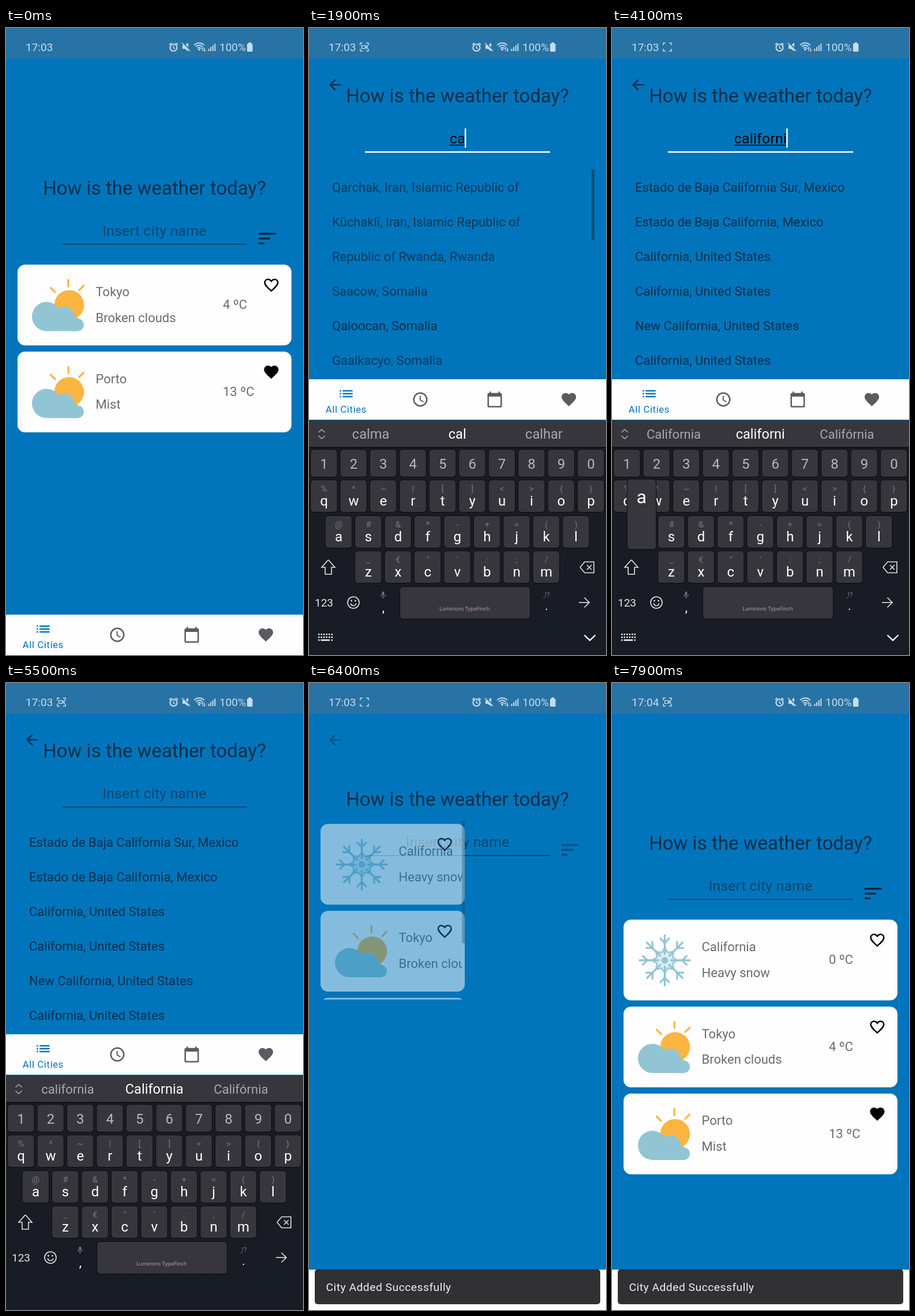
An HTML page with a canvas that plays this animation: 515 px wide and 1087 px high, repeating every 8 s.

```html
<!DOCTYPE html>
<html lang="en">
<head>
<meta charset="utf-8">
<title>Weather search</title>
<style>
html, body { margin: 0; height: 100%; overflow: hidden; background: #0075bb; }
canvas { display: block; width: 100vw; height: 100vh; }
</style>
</head>
<body>
<canvas id="stage" width="515" height="1087"></canvas>
<script>
const W = 515, H = 1087, MID = 257.5, LOOP = 8000;
const screen2d = document.getElementById('stage').getContext('2d');
const layer = document.createElement('canvas');
layer.width = W;
layer.height = H;
const layer2d = layer.getContext('2d');
let c = screen2d;

const BLUE = '#0075bb', INK = 'rgba(0,0,0,.6)', FAINT = 'rgba(0,0,0,.4)';
const SUN = '#fbb540', CLOUD = '#92c5d3', KEY = '#36363c', STATUS = '#c8dbe8', NAV = '#5c5c60';
const HINT = 'Insert city name';
const HEART = new Path2D('M12 21.35l-1.45-1.32C5.4 15.36 2 12.28 2 8.5 2 5.42 4.42 3 7.5 3c1.74 0 3.41.81 4.5 2.09C13.09 3.81 14.76 3 16.5 3 19.58 3 22 5.42 22 8.5c0 3.78-3.4 6.86-8.55 11.54z');

// Trailing spaces keep equally named results distinct.
const us = 'California, United States';
const baja = ['Estado de Baja California Sur, Mexico', 'Estado de Baja California, Mexico', us, us + ' '];
const withC = ['Qarchak, Iran, Islamic Republic of', 'Kūchaklī, Iran, Islamic Republic of',
  'Republic of Rwanda, Rwanda', 'Saacow, Somalia', 'Qaloocan, Somalia', 'Gaalkacyo, Somalia'];
const withCa = ['Qaloocan, Somalia', 'Caluula, Somalia', 'Cadale, Somalia', 'Calabar, Nigeria', 'Caracas, Venezuela', 'Calais, France'];
const withCal = ['Caluula, Somalia', 'Calabar, Nigeria', 'Calais, France', 'Calella, Spain', 'Calgary, Canada', 'Cali, Colombia'];
const withCali = ['Cali, Colombia', 'Calimaya, Mexico', ...baja];
const withCalif = [...baja, 'Califon, United States', 'New California, United States'];
const withCalifor = [...baja, 'New California, United States', us + '  '];

// time, typed text, suggestions, results
const steps = [
  [0, '', 'Não Mas E', []],
  [1350, 'c', 'com c como', withC],
  [1870, 'ca', 'calma cal calhar', withCa],
  [2130, 'cal', 'calma cal calhar', withCal],
  [2380, 'cali', 'California cali calibre', withCali],
  [2600, 'calif', 'California calif Califórnia', withCalif],
  [2850, 'califo', 'California califo Califórnia', withCalif],
  [3150, 'califor', 'California califor Califórnia', withCalifor],
  [3450, 'californ', 'California californ Califórnia', withCalifor],
  [3800, 'californi', 'California californi Califórnia', withCalifor],
  [4150, 'california', 'california California Califórnia', withCalifor]
];
const FOCUS = 150, CLEAR = 5450, ADDED = 5883;

const clamp = x => Math.max(0, Math.min(1, x));
const ramp = (t, from, span) => clamp((t - from) / span);
const ease = x => x * x * (3 - 2 * x);

function font(size, weight = 400, gap = 0, family = 'Roboto') {
  c.font = `${weight} ${size}px ${family}, sans-serif`;
  c.letterSpacing = gap + 'px';
}
function text(s, x, y, size, color, align = 'left', weight, gap, family) {
  font(size, weight, gap, family);
  c.textAlign = align;
  c.fillStyle = color;
  c.fillText(s, x, y);
}
function rect(x, y, w, h, color, r = 0) {
  c.fillStyle = color;
  c.beginPath();
  c.roundRect(x, y, w, h, r);
  c.fill();
}
function disc(x, y, r, color) {
  c.fillStyle = color;
  c.beginPath();
  c.arc(x, y, r, 0, 7);
  c.fill();
}
function arc(x, y, r, color, width, from = 0, to = 7) {
  c.strokeStyle = color;
  c.lineWidth = width;
  c.beginPath();
  c.arc(x, y, r, from, to);
  c.stroke();
}
function line(color, width, ...p) {
  c.strokeStyle = color;
  c.lineWidth = width;
  c.beginPath();
  for (let i = 0; i < p.length; i += 2) c.lineTo(p[i], p[i + 1]);
  c.stroke();
}
function group(draw, alpha = 1) {
  c.save();
  c.globalAlpha *= alpha;
  draw();
  c.restore();
}
// Draws in a 24-unit box centred on x, y.
function icon(x, y, scale, draw, alpha) {
  group(() => {
    c.translate(x - 12 * scale, y - 12 * scale);
    c.scale(scale, scale);
    draw();
  }, alpha);
}
function heart(x, y, color, full) {
  icon(x, y, 1.2517, () => {
    c.fillStyle = c.strokeStyle = color;
    if (full) return c.fill(HEART);
    c.clip(HEART);
    c.lineWidth = 4;
    c.stroke(HEART);
  });
}

function statusBar(t) {
  rect(0, 0, W, 53, '#2873a5');
  text(t < 7600 ? '17:03' : '17:04', 34, 40, 19, STATUS);
  if (t >= 100) {
    for (const a of [-1, 1]) for (const b of [-1, 1])
      line(STATUS, 1.5, 96 + 3 * a, 33 + 7 * b, 96 + 7 * a, 33 + 7 * b, 96 + 7 * a, 33 + 3 * b);
    if (t % 1000 >= 450) {
      c.strokeStyle = STATUS;
      c.lineWidth = 1.3;
      c.strokeRect(91.5, 30.5, 6, 5);
      line(STATUS, 1.3, 98, 33, 101, 30.5, 101, 35.5, 98, 33);
    }
  }
  arc(290.5, 34, 6, STATUS, 2.2);
  line(STATUS, 1.5, 290.5, 30.5, 290.5, 34.5, 293, 36);
  line(STATUS, 2, 283, 29, 287, 26);
  line(STATUS, 2, 298, 29, 294, 26);
  c.fillStyle = STATUS;
  c.beginPath();
  for (const [x, y] of [[306, 30], [310, 30], [316, 25.5], [316, 40.5], [310, 36], [306, 36]]) c.lineTo(x, y);
  c.fill();
  line('#2873a5', 3, 306, 25, 320, 40);
  line(STATUS, 1.6, 305, 26, 319, 40);
  for (const r of [4, 8, 12]) arc(335, 38, r, STATUS, 1.8, -2.4, -.74);
  disc(335, 37.5, 1.8, STATUS);
  line(STATUS, 1.3, 339, 36, 341, 34, 341, 40);
  line(STATUS, 1.3, 344, 34, 344, 40, 346, 38);
  for (let i = 0; i < 4; i++) rect(350.5 + 3.6 * i, 36 - 3 * i, 2, 4 + 3 * i, STATUS);
  text('100%', 370, 40, 19, STATUS);
  rect(418, 27, 9.5, 14, STATUS, 1.5);
  rect(420.5, 25, 4.5, 3, STATUS);
}

function navBar(top) {
  rect(0, top, W, 70, '#fefdff');
  icon(64.4, top + 25, 1.2517, () => {
    for (const y of [7, 11, 15]) {
      rect(3, y, 2, 2, BLUE);
      rect(7, y, 14, 2, BLUE);
    }
  });
  text('All Cities', 64.4, top + 58, 16.52, BLUE, 'center', 400, .69);
  icon(193, top + 35, 1.2517, () => {
    arc(12, 12, 9, NAV, 2);
    line(NAV, 1.6, 11.8, 7, 11.8, 12.6, 16.3, 15.4);
  });
  icon(322, top + 35, 1.2517, () => {
    rect(2, 3, 20, 20, NAV, 2);
    rect(4, 8, 16, 13, '#fefdff');
    rect(5, 1, 2, 3, NAV);
    rect(17, 1, 2, 3, NAV);
  });
  heart(450.6, top + 35, NAV, true);
}

function partlyCloudy() {
  disc(109.5, 70, 25.8, SUN);
  line(SUN, 3.2, 108.2, 26.5, 108.2, 37.5);
  line(SUN, 3.2, 77.5, 40, 85, 47.5);
  line(SUN, 3.2, 127, 44, 134.5, 36.5);
  disc(70.3, 89.8, 25.3, CLOUD);
  disc(101, 91, 18.5, CLOUD);
  rect(70, 92, 55, 23.2, CLOUD);
  rect(103, 93.5, 32, 21.7, CLOUD, 10.8);
}
function snowflake() {
  group(() => {
    c.translate(90.5 + 1, 70.5);
    for (let i = 0; i < 8; i++) {
      group(() => {
        c.rotate(i * Math.PI / 4);
        c.fillStyle = '#dcecf2';
        c.beginPath();
        c.moveTo(0, 0);
        c.lineTo(9, -12);
        c.lineTo(0, -22);
        c.lineTo(-9, -12);
        c.fill();
      });
    }
    for (let i = 0; i < 8; i++) {
      c.rotate(Math.PI / 4);
      line(CLOUD, 3.4, 0, -11, 0, -43.5);
      line(CLOUD, 3.2, -7.5, -38, 0, -30, 7.5, -38);
      line(CLOUD, 2.4, -5.5, -13.5, 0, -22, 5.5, -13.5);
      disc(0, -4.5, 1.8, CLOUD);
    }
    disc(0, 0, 4.8, CLOUD);
  });
}

function cards(t, p, bottom) {
  const data = [['Tokyo', 'Broken clouds', '4 ºC', false], ['Porto', 'Mist', '13 ºC', true]];
  if (t > 5600) data.unshift(['California', 'Heavy snow', '0 ºC', false]);
  const right = 20 + 475 * (1 - p), top = 410.3 - 351 * p;
  const end = (bottom - 12.4) * (1 - p) + 41 * p, view = end - top + 5;
  if (view <= 0 || right < 24) return;
  c = layer2d;
  c.clearRect(0, 0, W, H);
  group(() => {
    c.lineCap = 'round';
    c.beginPath();
    c.rect(20, top - 5, right - 20, view);
    c.clip();
    data.forEach(([city, sky, temp, liked], i) => group(() => {
      c.translate(0, top + 150.7 * i);
      rect(20, 0, right - 20, 140, '#fefdff', 13);
      group(() => {
        c.beginPath();
        c.rect(20, 0, right - 25, 140);
        c.clip();
        (city === 'California' ? snowflake : partlyCloudy)();
        text(city, 155.5, 54.5, 22.03, '#6b6b6e');
        text(sky, 155.5, 99.3, 22.03, '#6b6b6e');
        text(temp, 376, 77, 22.03, '#6b6b6e');
      });
      heart(right - 35, 35.5, '#000', liked);
    }));
    const content = 150.7 * data.length;
    if (view < content) rect(right - 5, top - 5, 5, view * view / content, 'rgba(0,0,0,.3)');
  });
  c = screen2d;
  group(() => c.drawImage(layer, 0, 0), 1 - p);
}

function results(t, k, p) {
  const now = steps[k][3], before = k ? steps[k - 1][3] : [], age = t - steps[k][0];
  const row = (s, i, alpha) => group(() => text(s.trim(), 40, 284 + 60 * i, 22.03, INK), alpha * p);
  group(() => {
    c.beginPath();
    c.rect(0, 225, W, 384);
    c.clip();
    before.forEach((s, i) => {
      if (!now.includes(s)) row(s, i, 1 - ramp(age, 0, 200));
    });
    now.forEach((s, i) => {
      const old = before.indexOf(s);
      if (old < 0) row(s, i, ramp(age, 150, 100));
      else row(s, old + (i - old) * ease(ramp(age, 100, 120)), 1);
    });
    const bar = ramp(t, 1500, 60) * (1 - ramp(t, 2000, 250));
    if (bar) group(() => rect(490, 245, 5, 123, 'rgba(0,0,0,.3)'), bar);
  });
}

function searchField(t, y, typed, lastKey) {
  const focused = t >= FOCUS && t < CLEAR;
  text('How is the weather today?', MID, y + 11.5, 33.05, INK, 'center');
  if (typed) text(typed, MID, y + 82.5, 24.78, '#000', 'center', 400, .23);
  else text(HINT, MID, y + 83, 24.78, FAINT, 'center', 400, .23);
  font(24.78, 400, .23);
  const half = c.measureText(typed || HINT).width / 2;
  if (typed) rect(MID - half, y + 85.5, 2 * half, 1.4, '#000');
  if (!focused) return rect(97, y + 97.2, 321, 1.4, INK);
  rect(97, y + 96.7, 321, 2.6, '#fff');
  if ((t - Math.max(lastKey, FOCUS)) % 1000 < 500)
    rect(MID + (typed ? half : -half) - 1, y + 57, 2.5, 33.5, '#fff');
}

const rows = [
  ['1234567890', '', 3, 731, 47],
  ['qwertyuiop', '%^~|[]<>{}', 3, 784, 55],
  ['asdfghjkl', '@#&*-+=()', 28.6, 846, 55],
  ['zxcvbnm', '_€"\':;/', 80, 907, 55]
];
function keyBox(x, y, w, h) {
  rect(x - 1, y - 1, w + 2, h + 2, '#0a0b0e', 6);
  rect(x, y, w, h, KEY, 5);
}
function keyboard(t, words, pressed) {
  const soft = '#e4e4e6', dim = '#77777c';
  const shade = c.createLinearGradient(0, 727, 0, H);
  shade.addColorStop(0, '#1b1c22');
  shade.addColorStop(1, '#181c25');
  rect(0, 680, W, 407, shade);
  rect(0, 680, W, 47, KEY);
  rect(0, 726.5, W, 1.5, '#08090b');
  line('#b0b0b4', 1.5, 16.5, 701, 22, 696, 27.5, 701);
  line('#b0b0b4', 1.5, 16.5, 707, 22, 712, 27.5, 707);
  words.split(' ').forEach((s, i) =>
    text(s, 107 + 150.2 * i, 712, i !== 1 && s.length > 8 ? 22 : 23.6, i === 1 ? '#fff' : '#a8a8ad', 'center'));

  let popup;
  for (const [keys, hints, x0, y, h] of rows) {
    [...keys].forEach((s, i) => {
      const x = x0 + 51.43 * i, mid = x + 23;
      keyBox(x, y, 45.5, h);
      if (hints) {
        text(hints[i], mid, y + 20, 15, dim, 'center');
        text(s, mid, y + 43.5, 24, '#fff', 'center');
      } else text(s, mid, y + 32.5, 24, '#b8b8bc', 'center');
      if (s === pressed) popup = [x, y];
    });
  }
  line(soft, 1.6, 33.5, 922, 45, 935, 39, 935, 39, 947, 28, 947, 28, 935, 22, 935, 33.5, 922);
  line(soft, 1.6, 470, 935, 478, 925.5, 494, 925.5, 494, 944.5, 478, 944.5, 470, 935);
  line(soft, 1.6, 482, 931, 490, 939);
  line(soft, 1.6, 490, 931, 482, 939);

  text('123', 26, 1003, 19, soft, 'center');
  arc(77, 996, 10, soft, 1.6);
  disc(73.5, 993, 1.4, soft);
  disc(80.5, 993, 1.4, soft);
  arc(77, 996.5, 5, soft, 1.4, .2, 2.94);
  rect(126.7, 977, 3.6, 7, dim, 1.8);
  arc(128.5, 982, 4, dim, 1.2, 0, Math.PI);
  line(dim, 1.2, 128.5, 986, 128.5, 989);
  text(',', 129, 1012, 22, '#fff', 'center');
  keyBox(158, 969, 225, 55);
  text('Luminoro TypeFinch', 270, 1010, 9.2, '#a5a5a9', 'center', 500, 0, 'Noto Sans');
  text(',!?', 412, 987, 12, dim, 'center');
  text('.', 412, 1009, 22, soft, 'center');
  line(soft, 1.6, 468, 996, 486, 996);
  line(soft, 1.6, 477.5, 987.5, 486, 996, 477.5, 1004.5);
  if (t < CLEAR) {
    for (let i = 0; i < 6; i++) for (const y of [1050, 1055, 1060])
      if (y < 1060 || i < 1 || i > 4) rect(16 + 4.5 * i, y, 2.4, 2.4, '#fff');
    rect(20.5, 1060, 15.5, 2.4, '#fff');
    line('#fff', 2.4, 477.5, 1052.5, 487, 1061.5, 496.5, 1052.5);
  }
  if (popup) {
    const [x, y] = popup;
    keyBox(x - 2, y - 63.5, 49.5, 121);
    text(pressed, x + 22.5, y - 22, 32, '#fff', 'center');
  }
}

function snackbar(t) {
  const k = ramp(t, ADDED, 150);
  if (!k) return;
  group(() => {
    c.translate(MID, 1047);
    c.scale(.8 + .2 * k, .8 + .2 * k);
    c.translate(-MID, -1047);
    rect(10, 1016.5, 495, 60.5, '#313033', 5);
    text('City Added Successfully', 29.5, 1054, 19.28, '#f4eff4', 'left', 400, .5);
  }, k);
}

function draw(t) {
  const k = steps.findLastIndex(s => t >= s[0]);
  const [lastKey, word, words] = steps[k];
  const typed = t < CLEAR ? word : '';
  const next = steps[k + 1];
  const pressed = next && t >= next[0] - 130 ? next[1].slice(-1) : '';
  const p = Math.min(ease(ramp(t, 237, 1000)), 1 - ease(ramp(t, ADDED, 1000)));
  const bottom = t >= 400 && t < 5530 ? 609 : 1017;
  const shown = Math.min(1 - (1 - ramp(t, 150, 250)) ** 2, 1 - ramp(t, 5510, 240) ** 2);
  const y = 277 - 160 * p;

  rect(0, 0, W, H, BLUE);
  searchField(t, y, typed, lastKey);
  icon(453, y + 88, 1.667, () => {
    [18, 12, 6].forEach((w, i) => rect(3, 6 + 5 * i, w, 2, 'rgba(0,0,0,.65)'));
  }, 1 - p);
  icon(45, 98.5, 1.2517, () => {
    c.strokeStyle = INK;
    c.lineWidth = 2;
    c.beginPath();
    c.moveTo(20, 12);
    c.lineTo(5, 12);
    c.moveTo(12.6, 4.7);
    c.lineTo(5.3, 12);
    c.lineTo(12.6, 19.3);
    c.stroke();
  }, p);
  if (t < 5600) results(t, k, p);
  cards(t, p, bottom);
  navBar(bottom);
  if (shown > 0) group(() => {
    c.translate(0, 407 * (1 - shown));
    keyboard(t, words, pressed);
  });
  snackbar(t);
  statusBar(t);
}

function tick() {
  draw(performance.now() % LOOP);
  requestAnimationFrame(tick);
}
tick();
</script>
</body>
</html>
```
